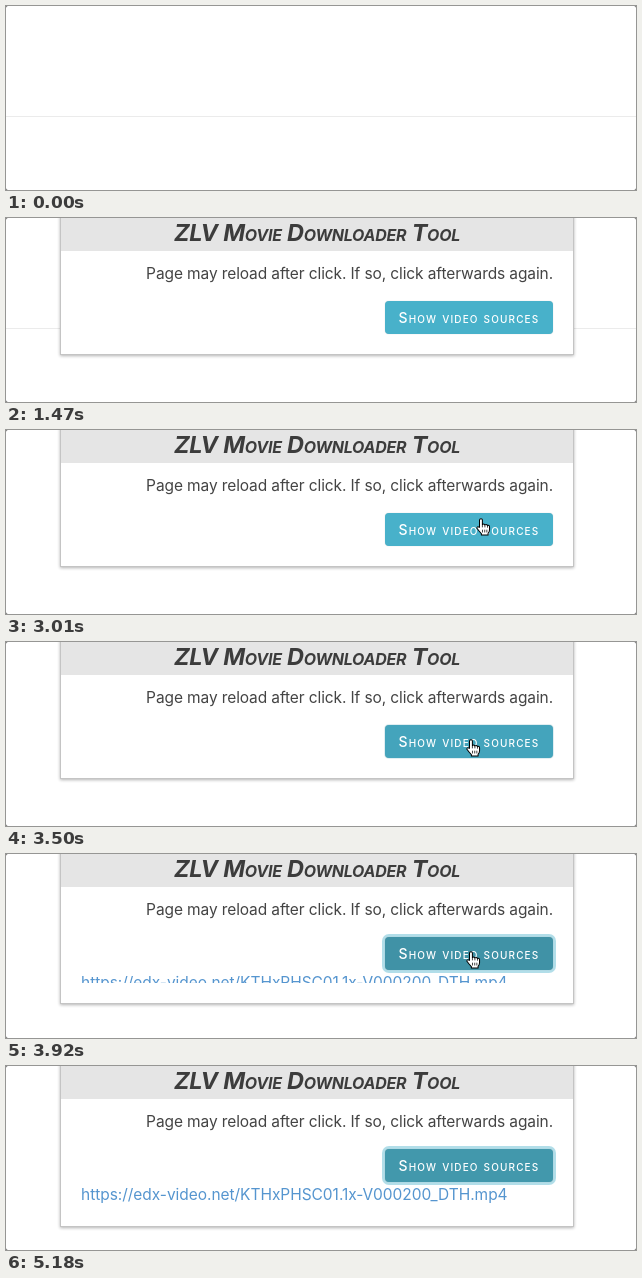
These frames come from a looping animation (630 by 184 pixels, 5.46 s). An HTML page:

```html
<!DOCTYPE html>
<html lang="en">
<head>
<meta charset="utf-8">
<title>Downloader demo</title>
<style>
  html, body { margin: 0; width: 100%; height: 100%; overflow: hidden; background: #555; }
  #stage {
    position: relative; width: 630px; height: 184px; overflow: hidden;
    background: #fff; border-radius: 2px;
    font: 15.5px Inter, "Open Sans", sans-serif; letter-spacing: -.11px; color: #444;
  }
  #stage div, #stage svg { position: absolute; white-space: nowrap; }
  #rule { left: 0; top: 110px; width: 630px; height: 1px; background: #ebebeb; }
  #panel {
    left: 54px; top: -10px; width: 512px; background: #fff;
    border: 1px solid #c4c4c4; box-shadow: 0 1px 3px rgba(0, 0, 0, .3);
  }
  #head {
    left: 0; top: 9px; width: 512px; height: 33px; background: #e5e5e5; color: #3c3c3c;
    font: italic 700 23.5px/30px Inter, "Open Sans", sans-serif;
    font-variant: small-caps; letter-spacing: -.25px; text-align: center;
  }
  #note { right: 20px; top: 53px; line-height: 24px; }
  #button {
    left: 324px; top: 92px; width: 168px; height: 33px; border-radius: 4px;
    color: #fff; font-size: 14px; font-weight: 500; font-variant: small-caps;
    line-height: 33px; letter-spacing: 1.15px; text-align: center;
  }
  #list { left: 20px; top: 125px; width: 472px; overflow: hidden; }
  #link { top: 1px; color: #5595cf; line-height: 24px; letter-spacing: -.04px; }
  svg { left: 0; top: 0; overflow: visible; }
</style>
</head>
<body>
<div id="stage">
  <div id="rule"></div>
  <div id="panel">
    <div id="head">ZLV Movie Downloader Tool</div>
    <div id="note">Page may reload after click. If so, click afterwards again.</div>
    <div id="button">Show video sources</div>
    <div id="list"><div id="link">https://edx-video.net/KTHxPHSC01.1x-V000200_DTH.mp4</div></div>
  </div>
  <svg id="arrow" width="14" height="20">
    <path d="M0 0V15.5L3.6 12.2L6 18L8.6 16.9L6.2 11.2H11Z" fill="#000" stroke="#fff"/>
  </svg>
  <svg id="hand" width="18" height="20">
    <g transform="scale(.93)">
      <path d="M-1.6 9V1.2Q-1.5 -.3 0 -.3T1.5 1.2V6Q2.8 4.8 4.2 6.3Q5.8 5.2 7 6.9Q9 6.3 9.2 8.4V11.5Q9 14 7.6 15.4V17.2H.4V15.6Q-2 13.4 -4.4 10Q-4.6 7.4 -1.6 9Z"
        fill="#fff" stroke="#000" stroke-width="1.1" stroke-linejoin="round"/>
      <path d="M1.5 6V9M4.2 6.5V9M7 7V9.3M1.6 11.5V14.5M4 11.5V14.5M6.3 11.5V14.5" stroke="#000" stroke-width=".8"/>
    </g>
  </svg>
</div>
<script>
const LOOP = 5460, STEP = 70;
const el = id => document.getElementById(id);
const clamp = x => Math.max(0, Math.min(1, x));
const ramp = (t, start, length) => clamp((t - start) / length);
const mix = (a, b, p) => a.map((v, i) => v + (b[i] - v) * p);
const show = (id, on) => el(id).style.display = on ? '' : 'none';

const IDLE = [72, 177, 202], PRESSED = [61, 139, 159], FOCUS = [66, 152, 172];

// Cursor tip at each step from the start of a move
const moves = [
  { start: 210, end: 490, path: [[342, 167], [370, 136], [441, 76], [531, 14]] },
  { start: 2730, end: 4550, path: [[546, -3], [536, 14], [512, 45], [489, 73],
      [475, 89], [469, 95], [466, 98], [465, 99], [465, 98]] },
  { start: 4550, end: 4830, path: [[454, 99], [403, 119], [288, 146], [131, 177]] }
];

function drawCursor(t) {
  const move = moves.find(m => t >= m.start && t < m.end);
  let kind = '';
  if (move) {
    const { path, start } = move;
    const [x, y] = path[Math.min(path.length - 1, Math.round((t - start) / STEP))];
    const onButton = x > 379 && x < 547 && y > 83 && y < 116;
    const onLink = x > 75 && x < 500 && y > 116 && y < 140;
    kind = t > 1470 && (onButton || onLink) ? 'hand' : 'arrow';
    el(kind).style.transform = `translate(${x}px, ${y}px)`;
  }
  show('arrow', kind === 'arrow');
  show('hand', kind === 'hand');
}

function draw(time) {
  const t = Math.floor(time % LOOP / STEP) * STEP;
  show('rule', t < 2240);
  show('panel', t >= 1470);

  const slide = .5 - Math.cos(Math.PI * ramp(t, 3710, 400)) / 2;
  el('panel').style.height = 145 + 24 * slide + 'px';
  el('list').style.height = 24 * slide + 'px';

  const press = ramp(t, 3450, 150);
  const colour = mix(mix(IDLE, PRESSED, press), FOCUS, ramp(t, 3780, 280));
  const { style } = el('button');
  style.background = `rgb(${colour.map(Math.round)})`;
  style.boxShadow = `0 0 1px #8888, 0 0 0 ${3 * press}px rgba(72, 177, 202, ${.42 * press})`;

  drawCursor(t);
}

const begin = performance.now();
function tick() {
  draw(performance.now() - begin);
  requestAnimationFrame(tick);
}
tick();
</script>
</body>
</html>
```
